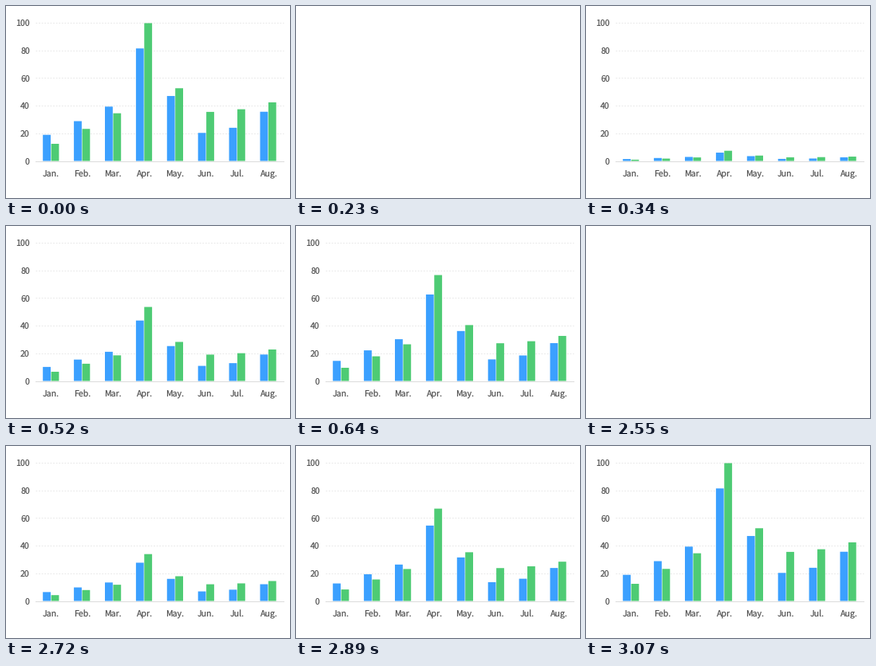
Write a matplotlib script that moves like this. It is 356x241 px and loops after 4.33 s.

```python
import matplotlib.pyplot as plt
from matplotlib.animation import FuncAnimation

WIDTH, HEIGHT, DPI = 356, 241, 100
PX = 72 / DPI
LOOP, INTERVAL = 4330, 10
STEP, LAST_STEP = 57.8, 9

BASE_Y, UNIT = 194.5, 1.735
LEFT, RIGHT = 36.5, 348
FIRST_X, PITCH = 56.3, 38.9
BAR_WIDTH = 9.8

MONTHS = ["Jan.", "Feb.", "Mar.", "Apr.", "May.", "Jun.", "Jul.", "Aug."]
# bar offset from the month centre, colour, values
SERIES = [
    (-10.1, "#3ba0ff", [18.9, 28.8, 39.3, 81.4, 47, 20.3, 24, 35.6]),
    (0.3, "#4ecb74", [12.4, 23.2, 34.5, 99.7, 52.6, 35.5, 37.4, 42.4]),
]
# start time, clock phase, growth at the first step
RUNS = [(230, 3, 0.074), (2550, 8, 0.12)]

plt.rcParams["text.hinting"] = "none"
fig = plt.figure(figsize=(WIDTH / DPI, HEIGHT / DPI), dpi=DPI, facecolor="white")
ax = fig.add_axes([0, 0, 1, 1])
ax.set_xlim(0, WIDTH)
ax.set_ylim(HEIGHT, 0)
ax.axis("off")


def label(x, y, text, align):
    return ax.text(x, y, text, ha=align, va="baseline", color="#595959",
                   family="Noto Sans CJK JP", fontsize=10.6 * PX)


def rule(y, color, style):
    return ax.plot([LEFT, RIGHT], [y, y], color=color, linestyle=style,
                   linewidth=PX, dash_capstyle="butt", zorder=1)[0]


def build_axes():
    parts = []
    for value in range(0, 101, 20):
        y = BASE_Y - value * UNIT
        parts.append(label(30, y + 4, str(value), "right"))
        if value:
            parts.append(rule(y, "#e8e8e8", (0, (1.8, 1.8))))
    parts.append(rule(BASE_Y, "#dcdcdc", "-"))
    for i, month in enumerate(MONTHS):
        parts.append(label(FIRST_X + i * PITCH, 213.5, month, "center"))
    return parts


def build_bars():
    bars = []
    for offset, color, values in SERIES:
        for i, value in enumerate(values):
            bar = plt.Rectangle((FIRST_X + i * PITCH + offset, BASE_Y), BAR_WIDTH, 0,
                                facecolor=color, linewidth=0, snap=False, zorder=2)
            ax.add_patch(bar)
            bars.append((bar, value))
    return bars


axis_parts = build_axes()
bars = build_bars()


def growth(time):
    """Share of the full bar height, or None while the chart is cleared."""
    for start, phase, first in RUNS:
        step = int((time - start + phase) / STEP)
        if time >= start and step < LAST_STEP:
            if step == 0:
                return None
            return first + (1 - first) * (step - 1) / (LAST_STEP - 1)
    return 1


def update(frame):
    share = growth(frame * INTERVAL)
    visible = share is not None
    for part in axis_parts:
        part.set_visible(visible)
    for bar, value in bars:
        bar.set_visible(visible)
        bar.set_height(-value * UNIT * (share or 0))
    return []


anim = FuncAnimation(fig, update, frames=LOOP // INTERVAL, interval=INTERVAL,
                     repeat=True, repeat_delay=0, blit=False)
plt.show()
```
